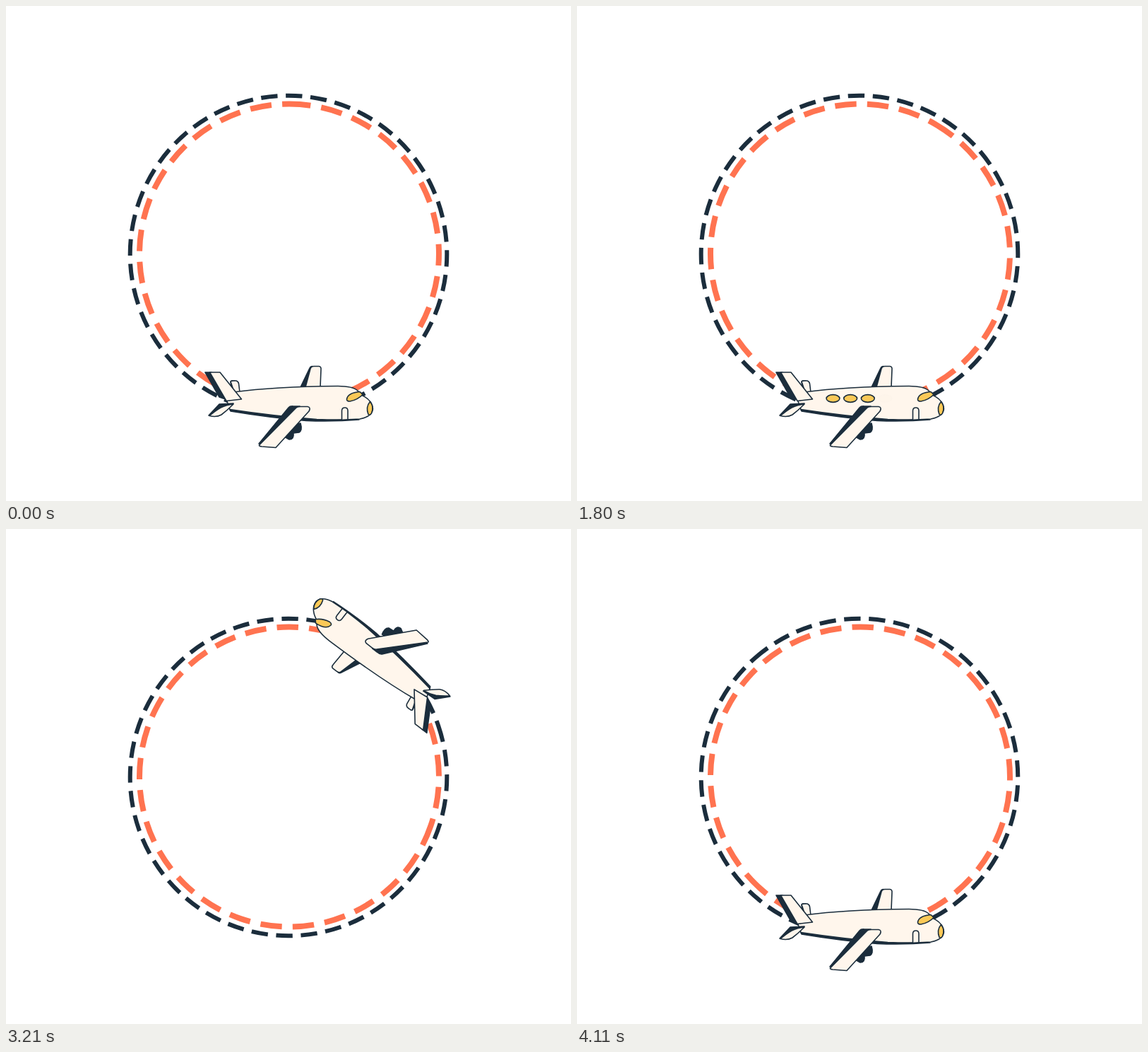
Write an HTML page that moves like this. It is 800 by 700 pixels and loops after 4.14 s.

```html
<!DOCTYPE html>
<html lang="en">
<head>
<meta charset="utf-8">
<title>Plane loop</title>
<style>
  html, body { margin: 0; width: 100%; height: 100%; overflow: hidden; background: #fff; }
  svg { display: block; width: 100vw; height: 100vh; }
  #plane { stroke: #1b2d3c; stroke-width: 1.6; stroke-linejoin: round; stroke-linecap: round; }
  .cream { fill: #fff6ec; }
  .dark { fill: #1b2d3c; }
  .gold { fill: #fbc957; }
</style>
</head>
<body>
<svg viewBox="0 0 800 700">
  <g fill="none">
    <circle id="outer" cx="400" cy="351" r="224.3" pathLength="360" stroke="#1b2d3c" stroke-width="6" stroke-dasharray="5.967 2.984"/>
    <circle id="inner" cx="401" cy="350.5" r="212" pathLength="360" stroke="#ff7350" stroke-width="8" stroke-dasharray="8.213 4.107"/>
  </g>
  <g id="plane">
    <!-- far wing and far tailplane -->
    <path class="dark" d="M417 539L430 512Q431 509.500 434 509.500L427 539Z"/>
    <path class="cream" d="M424 539L431 513Q432 509.500 436 509.500H443Q446.500 510 446 514L445 539Z"/>
    <path class="dark" d="M318 532L320 530L324 546H320Z"/>
    <path class="cream" d="M318 531Q319 529.500 326 530Q329 531 329.500 534L331 546H323Z"/>
    <!-- fuselage -->
    <path class="dark" d="M316 569L318 573Q372 582 425 586.500Q465 588 500 585L440 582Z"/>
    <path class="cream" d="M322 546C360 541 420 538 470 537.500Q491 537.500 498 544L503 550Q519 557 519.500 570Q518 581 501 584Q475 586 440 584.500Q380 580 317 570.500L313 559Z"/>
    <!-- tail -->
    <path class="dark" d="M282 518H291L316 558L302 553Z"/>
    <path class="cream" d="M288.500 518H303L333.500 556L312 558.500Z"/>
    <path class="dark" d="M287 579L302 563L322 562L299 577Z"/>
    <path class="cream" d="M288 579.500Q297 572 304 568Q312 564 322 563Q313 572 305 578Q298 582 288 579.500Z"/>
    <!-- engines and near wing -->
    <path class="dark" d="M404 592L417 590Q420 600 415 603L407 604Q408 613 401 613L394 609Z"/>
    <path class="dark" d="M358 619L400 568Q402 565.500 407 566H416L366 620Z"/>
    <path class="cream" d="M358.500 621L410 569Q412 566.500 417 566.500H427Q432 567.500 429 573L382 624.500L362 623Q358 622.500 358.500 621Z"/>
    <!-- cockpit, nose and door -->
    <path class="gold" d="M482.500 556Q484 547 501 545.500L505 549.500Q498 557 487 559Q482 559 482.500 556Z"/>
    <path class="gold" d="M515.500 559.500Q509 567 513 577.500Q515 579.500 517.500 576Q521.500 567 515.500 559.500Z"/>
    <path class="cream" d="M475.500 584.500V572.500Q475.500 568 479.800 568Q484 568 484 572.500V584"/>
    <g id="windows" class="gold"></g>
  </g>
</svg>
<script>
const LOOP = 4140, TURN = 2700, FADE = 200;
const FLIGHT_START = 2710, FLIGHT_TIME = 1401;
const byId = id => document.getElementById(id);
const clamp = v => Math.max(0, Math.min(1, v));

const windows = Array.from({ length: 5 }, (_, i) => {
  const pane = document.createElementNS("http://www.w3.org/2000/svg", "ellipse");
  const shape = { cx: 362.5 + 24.65 * i, cy: 555, rx: 9.4, ry: 5.4 };
  for (const key in shape) pane.setAttribute(key, shape[key]);
  byId("windows").append(pane);
  return pane;
});

function rotate(id, angle, x, y) {
  byId(id).setAttribute("transform", `rotate(${angle} ${x} ${y})`);
}

// Slow drift first, then half a turn during the flight.
function ringAngle(t) {
  return t < TURN ? 45 * t / TURN : 45 + 180 * (t - TURN) / (LOOP - TURN);
}

function flightAngle(t) {
  const u = clamp((t - FLIGHT_START) / FLIGHT_TIME);
  return -360 * (u + 3 * u * (1 - u) * (0.07 * (1 - u) + 0.03 * u));
}

function draw(t) {
  const angle = ringAngle(t);
  rotate("outer", 90 - angle, 400, 351);
  rotate("inner", angle - 90, 401, 350.5);
  rotate("plane", flightAngle(t), 400, 350);
  windows.forEach((pane, i) => {
    const shown = t < FLIGHT_START ? clamp((t - 450 * (i + 1)) / FADE) : 0;
    pane.setAttribute("opacity", shown);
  });
}

function tick() {
  draw(performance.now() % LOOP);
  requestAnimationFrame(tick);
}
draw(0);
requestAnimationFrame(tick);
</script>
</body>
</html>
```
